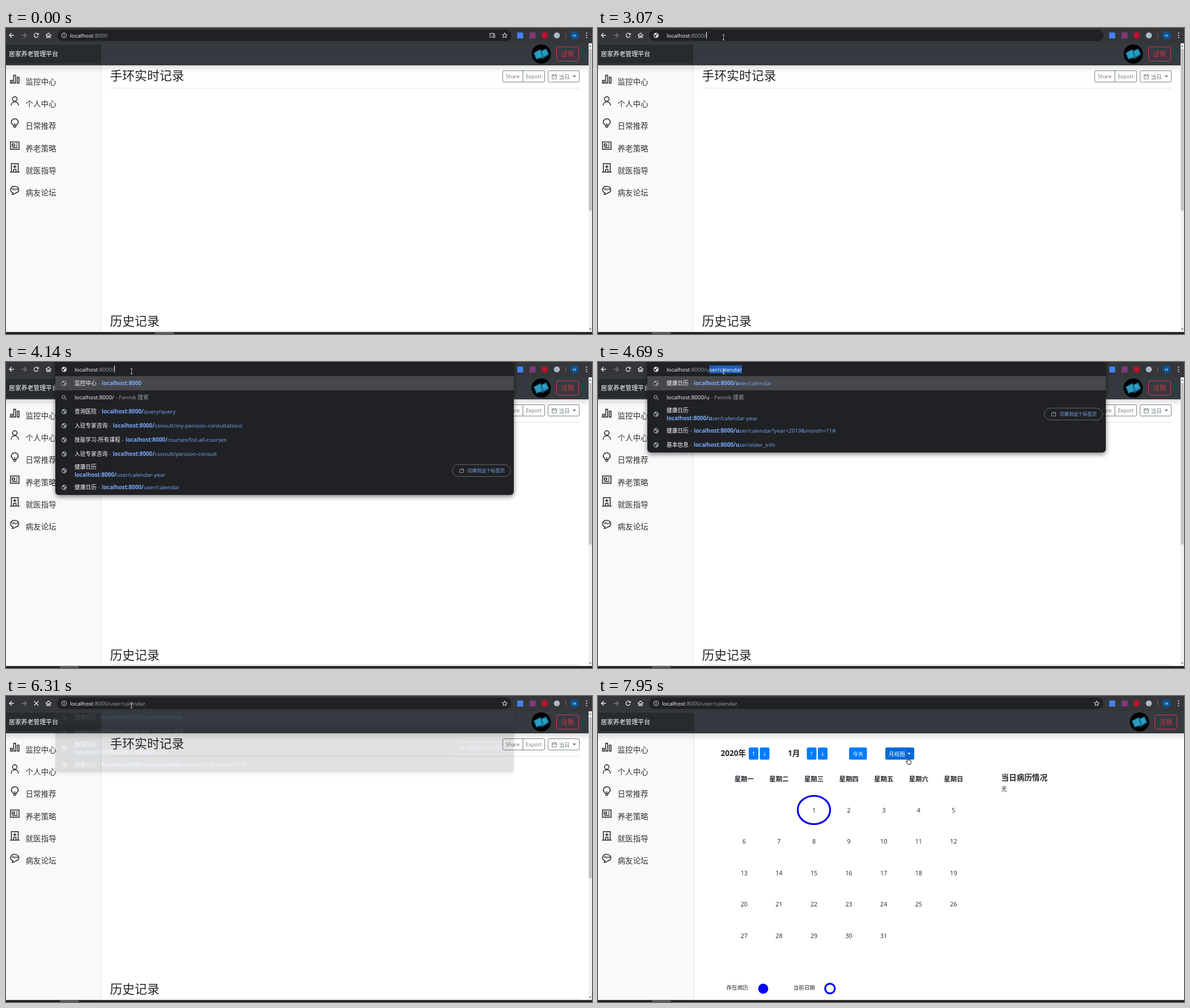
An HTML page with a canvas that plays this animation: 1034 px wide and 541 px high, repeating every 8000 ms.

```html
<!DOCTYPE html>
<html lang="zh-CN">
<head>
<meta charset="utf-8">
<title>居家养老管理平台</title>
<style>
html, body { margin: 0; width: 100%; height: 100%; overflow: hidden; background: #fff; }
canvas { display: block; width: 1034px; height: 541px; }
</style>
</head>
<body>
<canvas id="stage" width="1034" height="541"></canvas>
<script>
const stage = document.getElementById('stage').getContext('2d');
const popup = document.createElement('canvas');
popup.width = 1034;
popup.height = 541;
const layer = popup.getContext('2d');
let ctx = stage;

const LOOP = 8000;
const FONT = '"Open Sans", "Noto Sans CJK SC", "Noto Sans CJK", sans-serif';
const HOST = 'localhost:8000';
const INK = '#212529', GREY = '#6c757d', BAR = '#202124', DIM = '#9aa0a6', LINK = '#78a9f9', ICON = '#e8eaed';
const UI = 9.8;

function setFont(size, weight = 400) {
  ctx.font = `${weight} ${size}px ${FONT}`;
}
// Text with its glyphs centred vertically on y; returns the width.
function text(s, x, y, size, color, weight = 400, align = 'left') {
  setFont(size, weight);
  ctx.fillStyle = color;
  ctx.textAlign = align;
  ctx.fillText(s, x, y + size * 0.37);
  return ctx.measureText(s).width;
}
function width(s, size = UI) {
  setFont(size);
  return ctx.measureText(s).width;
}
function rect(x, y, w, h, color) {
  ctx.fillStyle = color;
  ctx.fillRect(x, y, w, h);
}
function round(x, y, w, h, r, fill, stroke, lw = 1) {
  ctx.beginPath();
  ctx.roundRect(x, y, w, h, r);
  paint(fill, stroke, lw);
}
function disc(x, y, r, fill, stroke, lw = 1, ry = r) {
  ctx.beginPath();
  ctx.ellipse(x, y, r, ry, 0, 0, 7);
  paint(fill, stroke, lw);
}
function paint(fill, stroke, lw) {
  if (fill) { ctx.fillStyle = fill; ctx.fill(); }
  if (stroke) { ctx.strokeStyle = stroke; ctx.lineWidth = lw; ctx.stroke(); }
}
// SVG path drawn relative to x, y.
function path(d, x, y, fill, stroke, lw = 1) {
  ctx.save();
  ctx.translate(x, y);
  const p = new Path2D(d);
  if (fill) { ctx.fillStyle = fill; ctx.fill(p); }
  if (stroke) { ctx.strokeStyle = stroke; ctx.lineWidth = lw; ctx.stroke(p); }
  ctx.restore();
}
function shadow(color, blur, dy) {
  ctx.shadowColor = color;
  ctx.shadowBlur = blur;
  ctx.shadowOffsetY = dy;
}

/* Browser toolbar */
function globe(x, y, color) {
  disc(x, y, 4.6, color);
  path('M-3.6 -1.5L-.5 -.6L.2 1.2L-.8 3.6L-3.5 1ZM.6 -3.6L3.2 -1.8L1.6 -.2L.2 -1.6ZM2 1.2L3.4 1L2 3Z', x, y, BAR);
}
function omniboxIcons(t) {
  if (t < 3070) {
    path('M-4 1.5V-3.5H4M-5 3H0M1.5 -1.5H4.5V3.5H1.5Z', 858, 13, null, ICON);
  }
  if (t < 3070 || t >= 6310) {
    path('M0 -4.4L1.3 -1.4L4.5 -1.1L2.1 1L2.8 4.1L0 2.5L-2.8 4.1L-2.1 1L-4.5 -1.1L-1.3 -1.4Z', 880, 13, null, ICON);
  }
}
function toolbar(t) {
  rect(0, 0, 1034, 27, '#35363a');
  path('M4 0H-4M0 -4L-4 0L0 4', 10, 13, null, ICON, 1.3);
  path('M-4 0H4M0 -4L4 0L0 4', 32, 13, null, '#77797d', 1.3);
  if (t >= 6310 && t < 6480) {
    path('M-3.7 -3.7L3.7 3.7M3.7 -3.7L-3.7 3.7', 53.5, 13, null, ICON, 1.4);
  } else {
    path('M3.2 1.2A3.7 3.7 0 1 1 2.5 -2.6', 53.5, 13, null, ICON, 1.3);
    path('M4.3 -4.6V-.7H.4Z', 53.5, 13, ICON);
  }
  path('M-4.7 .3L0 -4.2L4.7 .3M-3.1 -.6V3.9H-1V.9H1V3.9H3.1V-.6', 75, 13, null, ICON, 1.2);
  round(90, 3, 802, 20, 10, BAR);
  if (t >= 1580 && t < 3070) round(90.7, 3.2, 801, 19.6, 9.8, null, '#8ab4f8', 1.3);

  round(902, 8, 10.5, 10.5, 1, '#4285f4');
  round(924, 8, 10.5, 10.5, 1, '#80397b');
  disc(950.5, 13, 5.5, '#c70d2c');
  disc(972, 13, 5.3, '#a9b8c4');
  rect(987, 8, 1, 10, '#5f6368');
  disc(1003, 13, 7.5, '#0b5394');
  text('H', 1003, 13, 8, '#fff', 400, 'center');
  for (const dy of [-4, 0, 4]) disc(1024.5, 13 + dy, 1.1, ICON);
}

const typedAt = [[5610, 'user/calendar'], [5000, 'user'], [4920, 'use'], [4840, 'us'], [4690, 'u'], [3070, '']];
function typed(t) {
  const hit = typedAt.find(([at]) => t >= at);
  return hit ? hit[1] : '';
}
function caretOn(t) {
  return (t >= 2210 && t < 2750) || (t >= 3070 && t < 3600) || (t >= 4140 && t < 4690) || (t >= 5610 && t < 6160);
}
function address(t) {
  const editing = t >= 3070 && t < 6310;
  const x = editing ? 121 : 113;
  if (editing) {
    globe(102.5, 13, ICON);
  } else {
    disc(102.5, 13, 4.1, null, ICON, 1);
    rect(102, 12.3, 1, 3, ICON);
    rect(102, 10.4, 1, 1.1, ICON);
  }
  const tail = t < 3070 ? '' : '/' + (t >= 6310 ? 'user/calendar' : typed(t));
  const end = x + width(HOST + tail);
  const picked = t >= 1580 && t < 2210;
  if (picked) rect(x, 6, end - x, 14, '#1a5fb8');
  const w = text('localhost', x, 13, UI, '#fff');
  text(':8000' + tail, x + w, 13, UI, picked ? '#fff' : DIM);
  if (t >= 4690 && t < 5610) {
    const rest = 'user/calendar'.slice(typed(t).length);
    rect(end, 6, width(rest), 14, '#1a5fb8');
    text(rest, end, 13, UI, '#fff');
  }
  if (caretOn(t)) rect(Math.round(end), 6.5, 1, 12, '#fff');
  omniboxIcons(t);
}

/* Suggestion list */
const SEARCH = ['', ''];
const yearRow = ['健康日历', '/user/calendar-year', true];
const calRow = ['健康日历', '/user/calendar'];
const firstRows = [
  ['监控中心', ''], SEARCH, ['查询医院', '/query/query'],
  ['入驻专家咨询', '/consult/my-pension-consultations'],
  ['技能学习-所有课程', '/courses/list-all-courses'],
  ['入驻专家咨询', '/consult/pension-consult'], yearRow, calRow
];
const userRows = [calRow, SEARCH, yearRow, ['健康日历', '/user/calendar?year=2019&month=11#'], ['基本信息', '/user/elder_info']];

function suggestUrl(url, query, x, y) {
  const w = text(url.slice(0, query.length), x, y, UI, LINK, 700);
  text(url.slice(query.length), x + w, y, UI, LINK);
}
function suggestionRow(row, query, y, h) {
  const [title, tail, tab] = row;
  const mid = y + h / 2 + 0.2;
  if (row === SEARCH) {
    disc(101.7, mid - 0.8, 2.7, null, DIM, 1.1);
    path('M0 0L3 3', 103.6, mid + 1.1, null, DIM, 1.2);
    const w = text(query, 121, mid, UI, '#fff');
    text('- Fennik 搜索', 121 + w + 3, mid, UI, DIM);
    return;
  }
  globe(102.5, mid, DIM);
  const w = text(title, 121, tab ? mid - 6.5 : mid, UI - 0.1, '#fff');
  if (tab) {
    suggestUrl(HOST + tail, query, 121, mid + 7.5);
    round(787.5, Math.floor(mid) - 10.5, 103, 21, 10.5, null, '#5f6368');
    path('M-3.5 -3H3.5V3.2H-3.5ZM.5 -3V-1H3.5', 804, mid, null, DIM, 0.9);
    text('切换到这个标签页', 814.5, mid, 8.2, LINK);
  } else {
    text('-', 121 + w + 2.8, mid, UI, DIM);
    suggestUrl(HOST + tail, query, 121 + w + 9.3, mid);
  }
}
function suggestionList(t) {
  const rows = t < 4690 ? firstRows : t < 5610 ? userRows : userRows.slice(0, 4);
  const query = HOST + '/' + typed(t);
  const height = row => row[2] ? 34 : 25;
  const bottom = 26 + rows.reduce((sum, row) => sum + height(row), 0);
  ctx.save();
  shadow('rgba(0,0,0,.5)', 8, 3);
  round(87, -8, 809, bottom + 8, 6, BAR);
  ctx.restore();
  rect(87, 25, 809, 25, '#47484b');
  let y = 25;
  for (const row of rows) {
    suggestionRow(row, query, y, height(row));
    y += height(row);
  }
}
// The list fades as one piece, so it is composed on its own layer.
function suggestions(t) {
  const closing = t >= 6310;
  ctx = layer;
  ctx.clearRect(0, 0, 1034, 541);
  suggestionList(t);
  if (closing) ctx.clearRect(0, 0, 1034, 26);
  ctx = stage;
  ctx.globalAlpha = closing ? 0.13 : t < 3220 ? 0.97 : 1;
  ctx.drawImage(popup, 0, 0);
  ctx.globalAlpha = 1;
}

/* Site frame */
const menu = ['监控中心', '个人中心', '日常推荐', '养老策略', '就医指导', '病友论坛'];
const menuIcons = [
  'M-7.5 2.5H-4.5V7.5H-7.5ZM-2 -6.5H1.5V7.5H-2ZM4.5 -3H7.5V7.5H4.5Z',
  'M4 -3.8A4 4 0 1 1 -4 -3.8A4 4 0 1 1 4 -3.8M-6.5 8C-6 -1.5 6 -1.5 6.5 8',
  'M-2.5 4.5V3C-9 -1 -5.5 -8 0 -8S9 -1 2.5 3V4.5ZM-2.5 7H2.5M0 4V0',
  'M-7.5 -6.5H7.5V6.5H-7.5ZM-4.5 -3H-.5V.8H-4.5ZM2 -2.8H5M2 .5H5M-4.5 3.6H5',
  'M-8.5 7.5H8.5M-6 7.5V-7.5H6V7.5M-2.2 7.5V3H2.2V7.5M0 -5V1M-3 -2H3',
  'M-3 4.8C-10 3 -9 -6.5 0 -6.5S9.5 4.5 1.5 5.2C0 6.6 -2 7.6 -4.3 7.8C-3.2 6.8 -3 6 -3 4.8Z'
];
function sidebar(w) {
  rect(0, 27, w, 511, '#f8f9fa');
  rect(w - 1, 27, 1, 511, '#dfe1e2');
  menu.forEach((name, i) => {
    path(menuIcons[i], 15.5, 90 + i * 39.3, null, '#222', 1.5);
    text(name, 34.5, 95 + i * 39.2, 13.6, '#333');
  });
  text('TALK', 15.5, 285.5, 5, '#222', 700, 'center');
}
function header(w, side, dx) {
  ctx.save();
  ctx.beginPath();
  ctx.rect(0, 27, w, 80);
  ctx.clip();
  shadow('rgba(0,0,0,.15)', 10.9, 5.4);
  rect(-20, 20, w + 40, 46, '#343a40');
  ctx.restore();
  rect(0, 29.5, side + 1, 33.5, '#272b30');
  text('居家养老管理平台', 5, 46.3, 10.9, '#fff');
  disc(944.5 + dx, 46, 17, '#000');
  path('M-14 -2L-1 -9L0 -6L9 -10L14 1L2 9L-1 7L-9 10Z', 944.5 + dx, 46, '#0f5f80');
  path('M-12 -2L-2 -7L2 5L-8 8ZM1 -5L8 -8L12 0L4 5Z', 944.5 + dx, 46, '#2a9cc0');
  round(971.5 + dx, 33.5, 39, 25, 3, null, '#dc3545');
  text('注销', 990.8 + dx, 46, 11.2, '#dc3545', 400, 'center');
}
function taskbar(t) {
  rect(0, 537.5, 1034, 4, '#1d1e20');
  rect(t < 1580 ? 263 : 95, 538, 33.5, 3, '#55585c');
}

/* Pages */
function monitorPage() {
  sidebar(168);
  header(1028, 167, 0);
  text('手环实时记录', 183.5, 84, 21.8, INK);
  rect(183.5, 106, 828, 1, '#dee2e6');
  round(876.5, 75.5, 74, 20, 2, null, GREY, 0.9);
  rect(911.5, 76, 1, 20, GREY);
  text('Share', 894.2, 86, 9.1, GREY, 400, 'center');
  text('Export', 931.2, 86, 9.1, GREY, 400, 'center');
  round(956.5, 75.5, 55, 20, 2, null, GREY, 0.9);
  path('M-4 -3H4V4H-4ZM-4 -.8H4M-2 -4.6V-2.4M2 -4.6V-2.4', 967.5, 86, null, GREY, 0.9);
  text('当日', 975.5, 86, 9.6, GREY);
  path('M-3.2 -1.5H3.2L0 1.7Z', 1002.8, 85.5, GREY);
  text('历史记录', 183.5, 518, 21.8, INK);
  rect(183.5, 535, 828, 1, '#dee2e6');
  rect(1028, 27, 6, 511, '#f1f1f1');
  rect(1028.5, 37, 5, 285.5, '#c1c1c1');
  path('M-2 1H2L0 -1.2Z', 1031, 32, '#555');
  path('M-2 -1H2L0 1.2Z', 1031, 532.5, '#555');
}
function button(x, w, label, color = '#007bff', size = 9.6) {
  round(x, 91, w, 21.5, 2.5, color);
  text(label, x + w / 2, 102, size, '#fff', 400, 'center');
}
function calendarPage(t) {
  sidebar(169.5);
  header(1034, 168.5, 11);
  text('2020年', 216.5, 100.5, 13.6, INK, 700);
  text('1月', 335, 100.5, 13.6, INK, 700);
  for (const x of [266, 368.5]) {
    button(x, 17, '↑', undefined, 8.5);
    button(x + 19.5, 17, '↓', undefined, 8.5);
  }
  button(443, 31.5, '今天');
  button(507, 51, '', t >= 7870 ? '#0069d9' : '#007bff');
  text('月视图', 513, 102, 9.6, '#fff');
  path('M-2.8 -1.4H2.8L0 1.5Z', 549, 101.8, '#fff');

  const col = i => 257.8 + i * 61.6;
  [...'一二三四五六日'].forEach((d, i) => text('星期' + d, col(i), 147, 11.4, INK, 700, 'center'));
  for (let d = 1; d <= 31; d++) {
    const cell = d + 1;
    text(String(d), col(cell % 7), 202 + Math.floor(cell / 7) * 55.5, 10.7, INK, 400, 'center');
  }
  disc(381, 201.5, 28.6, null, '#0000f5', 3.2, 25);
  text('当日病历情况', 711.5, 144, 13.6, INK, 700);
  text('无', 711.5, 164, 10.2, INK);
  text('存在病历', 226.5, 515, 9.6, INK);
  disc(291.5, 517.5, 8.9, '#00f');
  text('当前日期', 344.5, 515, 9.6, INK);
  disc(409.3, 517.3, 8.6, null, '#00f', 3.2);
}

/* Pointer */
function beam(x, y) {
  path('M-2 -4.5H2M-2 4.5H2M0 -4.5V4.5', x + 0.5, y + 0.5, null, '#c4c6c8', 0.9);
}
function arrow(x, y) {
  path('M0 0V11.5L2.7 9L4.5 13L6.4 12.2L4.6 8.3H8.2Z', x, y, '#fff', '#000', 0.8);
}
function hand(x, y) {
  path('M-2.2 -5.5C-2 -6.6 -.6 -6.6 -.4 -5.5V-1.8L3.6 -1C4.4 -.8 4.7 -.2 4.6 .6L3.8 5.8H-1.4L-4.6 1.2C-4.6 .2 -3.4 0 -2.2 1.4Z', x, y, '#fff', '#000', 0.9);
}
function sweep(t, start, step, a, c, b) {
  const k = Math.min(1, (Math.floor((t - start) / step) + 1) / 11);
  const p = k * k * (3 - 2 * k), q = 1 - p;
  const at = i => q * q * a[i] + 2 * q * p * c[i] + p * p * b[i];
  return [at(0), at(1)];
}
function drift(t, start, a, b) {
  const k = Math.min(4, Math.floor((t - start) / 77) + 1) / 4;
  return a.map((v, i) => v + (b[i] - v) * k);
}
function pointer(t) {
  if (t < 200) return;
  if (t >= 7950) return hand(548, 115);
  let p = [221, 16];
  if (t < 1050) p = sweep(t, 200, 77, [921, 506], [-171, 90], [224, 6]);
  else if (t < 1430) p = drift(t, 1050, [224, 6], [218, 14]);
  else if (t < 2060) p = [216, 12];
  else if (t < 2440) p = drift(t, 2060, [216, 12], [221, 15]);
  else if (t >= 7090) p = sweep(t, 7090, 78, [221, 16], [-100, 70], [545, 109]);
  (p[1] < 26 ? beam : arrow)(Math.round(p[0]), Math.round(p[1]));
}

function draw(t) {
  rect(0, 0, 1034, 541, '#fff');
  if (t < 6480) monitorPage(); else calendarPage(t);
  taskbar(t);
  toolbar(t);
  if (t >= 3140 && t < 6400) suggestions(t);
  address(t);
  pointer(t);
}
function loop() {
  draw(performance.now() % LOOP);
  requestAnimationFrame(loop);
}
loop();
</script>
</body>
</html>
```
